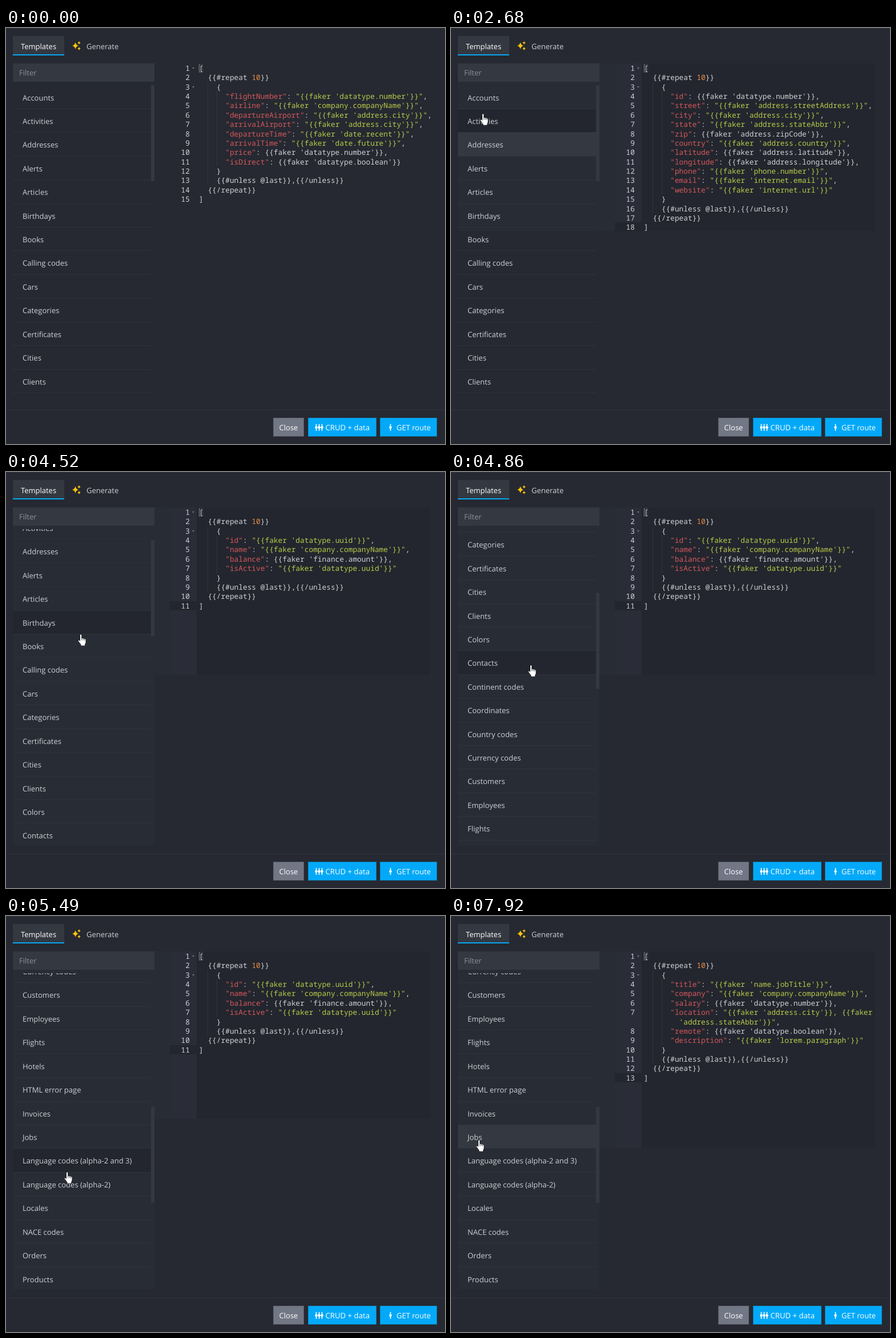
Write an HTML page that moves like this. It is 769x728 px and loops after 8000 ms.

```html
<!DOCTYPE html>
<html lang="en">
<head>
<meta charset="utf-8">
<title>Templates</title>
<style>
html, body { margin: 0; width: 100%; height: 100%; overflow: hidden; background: #262931; }
body { font: 13px "Open Sans", "Noto Sans", sans-serif; color: #cdd0d7; text-rendering: geometricPrecision; }
#stage { position: relative; width: 769px; height: 728px; overflow: hidden; background: #262931; }
#stage div, #stage svg { position: absolute; box-sizing: border-box; white-space: pre; }
.rule { left: 0; width: 769px; height: 1px; background: #31343d; }
.tab { left: 12px; top: 14px; width: 90px; height: 34px; line-height: 36px; text-align: center; color: #fff; background: #343841; border-bottom: 2px solid #03a9f4; }
.generate { left: 141px; top: 14px; line-height: 36px; }
.filter { left: 12px; top: 62px; width: 248px; height: 32px; padding-left: 11px; line-height: 32px; color: #8d919b; background: #343841; }
.tint { left: 12px; width: 248px; background: #282c34; }
#list { left: 12px; top: 100px; width: 248px; height: 554px; overflow: hidden; }
#rows { left: 0; top: .5px; width: 242px; }
.row { left: 0; width: 242px; height: 41.42px; padding-left: 17px; line-height: 42.4px; border-bottom: 1px solid #2f333c; }
.row.hover { background: #23262e; }
.row.lit { background: #343841; }
#bar { left: 242px; top: 0; width: 6px; height: 168px; background: #343843; }
.code { left: 287px; top: 62px; width: 456px; font: 12.833px "Noto Sans Mono", "DejaVu Sans Mono", monospace; color: #cfd1d6; }
.panel, .gutter, .margin { top: 0; height: 293px; }
.panel { left: 47px; width: 409px; background: #23262e; }
.gutter { left: 0; width: 47px; background: #2a2d37; }
.margin { left: -27px; width: 27px; background: #282c34; }
.tall .panel, .tall .gutter, .tall .margin { height: 343px; }
.plain .panel, .plain .gutter, .plain .margin, .plain .active { background: none; }
.active { left: 0; width: 47px; height: 16px; background: #23262e; }
.line { left: 51px; line-height: 16.37px; }
.num { left: 0; width: 35px; text-align: right; line-height: 16.37px; }
.fold { left: 39px; border: 2.5px solid transparent; border-top: 3px solid #6d717b; border-bottom: 0; }
.guide { width: 1px; background: #32353e; }
.key { color: #d5575c; }
.str { color: #b9ca4a; }
.int { color: #e78c45; }
#caret { left: 338px; top: 63px; width: 7px; height: 15px; border: 1px solid #444851; border-left-color: #8b8f97; }
.btn { top: 682px; height: 33px; line-height: 32px; color: #fff; background: #03a9f8; border: 1px solid rgba(38, 41, 49, .3); }
#hand { left: 0; top: 0; }
</style>
</head>
<body>
<div id="stage">
  <div class="rule" style="top:0"></div>
  <div class="tab">Templates</div>
  <svg style="left:115px;top:22px" width="18" height="18" fill="#ffc40c">
    <path d="M6.5 3Q7.6 8 12 9Q7.6 10 6.5 15Q5.4 10 1 9Q5.4 8 6.5 3Z"/>
    <path d="M13 1Q13.4 3.6 16 4Q13.4 4.4 13 7Q12.6 4.4 10 4Q12.6 3.6 13 1Z"/>
    <path d="M13 11Q13.4 13.6 16 14Q13.4 14.4 13 17Q12.6 14.4 10 14Q12.6 13.6 13 11Z"/>
  </svg>
  <div class="generate">Generate</div>
  <div class="tint" id="side" style="top:62px;height:293px"></div>
  <div class="tint" id="below" style="top:355px;height:299px"></div>
  <div class="filter">Filter</div>
  <div id="list"><div id="rows"></div><div id="bar"></div></div>
  <div id="editor"></div>
  <div id="caret"></div>
  <div class="rule" style="top:668px"></div>
  <div class="btn" style="left:468px;width:54px;text-align:center;background:#727786">Close</div>
  <div class="btn" style="left:529px;width:120px;padding-left:29.5px;font-size:13.2px">CRUD + data</div>
  <div class="btn" style="left:655px;width:100px;padding-left:28px">GET route</div>
  <svg id="icons" style="left:529px;top:682px" width="226" height="33" fill="#fff"></svg>
  <svg id="hand" width="16" height="22" style="overflow:visible">
    <path fill="#fff" stroke="#15171c" stroke-width=".9" d="M4.5 2.5a1.6 1.6 0 0 1 3.2 0v5.5c.6-.9 2.3-.6 2.6.4c.8-.7 2.2-.3 2.4.7c1-.5 2.3.1 2.3 1.4v4c0 2-1 3-1.4 4.5v2.2h-7.6v-2c-1-1.8-2.6-3.6-4.3-6c-1-1.5.6-2.8 1.8-1.8l1 1z"/>
    <path fill="none" stroke="#15171c" stroke-width=".8" d="M7.7 8v3.5M10.3 8.5v3M12.7 9.3v2.5"/>
  </svg>
</div>
<script>
const LOOP = 8000, PITCH = 41.42, LINE = 16.37, CH = 7.7;
const $ = id => document.getElementById(id);
const add = (parent, cls, css = {}, html = '') => {
  const el = document.createElement('div');
  el.className = cls;
  el.innerHTML = html;
  Object.assign(el.style, css);
  return parent.appendChild(el);
};

const names = ('Accounts,Activities,Addresses,Alerts,Articles,Birthdays,Books,Calling codes,Cars,Categories,' +
  'Certificates,Cities,Clients,Colors,Contacts,Continent codes,Coordinates,Country codes,Currency codes,' +
  'Customers,Employees,Flights,Hotels,HTML error page,Invoices,Jobs,Language codes (alpha-2 and 3),' +
  'Language codes (alpha-2),Locales,NACE codes,Orders,Products').split(',');
const rows = names.map((name, i) => add($('rows'), 'row', { top: i * PITCH + 'px' }, name));

$('icons').innerHTML = [14.5, 19.5, 24.5, 144.5].map(x =>
  `<rect x="${x - .8}" y="11" width="1.6" height="12"/><circle cx="${x}" cy="17" r="2.3"/>`).join('');

// Fields are "key path"; a trailing "!" leaves the value unquoted.
const templates = [
  'flightNumber datatype.number,airline company.companyName,departureAirport address.city,arrivalAirport address.city,' +
    'departureTime date.recent,arrivalTime date.future,price datatype.number!,isDirect datatype.boolean!',
  'id datatype.number!,street address.streetAddress,city address.city,state address.stateAbbr,zip address.zipCode!,' +
    'country address.country,latitude address.latitude!,longitude address.longitude!,phone phone.number,' +
    'email internet.email,website internet.url',
  'id datatype.uuid,name company.companyName,balance finance.amount!,isActive datatype.uuid',
  'title name.jobTitle,company company.companyName,salary datatype.number!,location address.city+address.stateAbbr,' +
    'remote datatype.boolean!,description lorem.paragraph'
];

function field(spec, i, all) {
  const [key, path] = spec.split(' ');
  const quote = path.endsWith('!') ? '' : '"';
  const value = path.replace('!', '').split('+').map(p => `{{faker '${p}'}}`).join(', ');
  const text = `      "${key}": ${quote}${value}${quote}${i < all.length - 1 ? ',' : ''}`;
  return text.replace(/, \{\{faker /, ", {{faker\n        ").split('\n');
}

const paint = text => text.replace(/^ {8}[^"]*"|"[^"]*"?|\b10\b/g, m =>
  `<span class="${m === '10' ? 'int' : /^"\w+"$/.test(m) ? 'key' : 'str'}">${m}</span>`);

function buildCode(spec, index) {
  const fields = spec.split(',').flatMap(field);
  const lines = ['[', '  {{#repeat 10}}', '    {', ...fields, '    }',
    '    {{#unless @last}},{{/unless}}', '  {{/repeat}}', ']'];
  const box = add($('editor'), 'code' + (index === 0 ? ' plain' : index === 3 ? ' tall' : ''));
  const at = i => i * LINE + 'px';
  for (const part of ['margin', 'gutter', 'panel']) add(box, part);
  add(box, 'active', { top: at(lines.length - 1) });
  add(box, 'guide', { left: 51 + 2 * CH + 'px', top: at(2), height: at(fields.length + 3) });
  add(box, 'guide', { left: 51 + 4 * CH + 'px', top: at(3), height: at(fields.length) });
  let n = 0;
  lines.forEach((text, i) => {
    add(box, 'line', { top: at(i) }, paint(text));
    if (!text.startsWith(' '.repeat(8))) add(box, 'num', { top: at(i) }, ++n);
  });
  for (const i of [0, 2]) add(box, 'fold', { top: i * LINE + 7 + 'px' });
  return box;
}
const codes = templates.map(buildCode);

// Bursts of movement: start, end, number of steps.
const bursts = [[1200, 1460, 4], [2340, 2870, 7], [3480, 3630, 3], [3890, 4680, 10],
  [4770, 5490, 9], [5580, 6310, 9], [7830, 7920, 2]];
const pointer = [[1200, 47, 211.5], [2250, 47, 211.5], [2870, 63, 138.5], [3800, 63, 138.5], [4504.5, 133, 293.4],
  [4680, 138, 318], [5130, 148, 392], [5490, 109, 457], [6127, 49, 401], [7830, 49, 401], [7920, 51, 401]];
const scroll = [[4416, 0], [4504.5, 65.2], [4680, 230], [4770, 300], [5130, 568], [5490, 770]];

function snap(t) {
  let s = 0;
  for (const [a, b, n] of bursts) {
    if (t < a) break;
    const step = (b - a) / (n - 1);
    s = a + Math.min(n - 1, Math.floor((t - a) / step + .22)) * step;
  }
  return s;
}

function track(keys, t, axis) {
  const next = keys.findIndex(k => k[0] > t);
  if (next === 0) return keys[0][axis];
  if (next < 0) return keys[keys.length - 1][axis];
  const a = keys[next - 1], b = keys[next];
  return a[axis] + (b[axis] - a[axis]) * (t - a[0]) / (b[0] - a[0]);
}

const show = (el, on) => { el.style.visibility = on ? 'visible' : 'hidden'; };
const within = (t, a, b) => t >= a && t < b;

function draw(now) {
  const t = snap(now % LOOP);
  const x = track(pointer, t, 1), y = track(pointer, t, 2), top = track(scroll, t, 1);
  const code = t < 1360 ? 0 : t < 3550 ? 1 : t < 6200 ? 2 : 3;
  const lit = within(t, 1280, 3480) ? 2 : within(t, 3480, 3620) ? 0 : t > 6120 ? 25 : -1;
  const hover = t < 1200 ? -1 : Math.floor((y - 111.5 + top) / PITCH);

  codes.forEach((el, i) => show(el, i === code));
  rows.forEach((el, i) => {
    el.className = 'row' + (i === lit ? ' lit' : i === hover ? ' hover' : '');
  });
  show($('side'), code > 0);
  show($('below'), t > 4400);
  show($('caret'), !within(t, 1360, 1450) && !within(t, 3480, 3620) && !within(t, 6200, 6300));
  show($('hand'), t >= 1200);
  $('hand').style.transform = `translate(${Math.round(x - 8)}px, ${Math.round(y - 10.5)}px)`;
  $('rows').style.transform = `translateY(${-top}px)`;
  $('bar').style.transform = `translateY(${top * .304}px)`;
}

const start = performance.now();
function tick() {
  draw(performance.now() - start);
  requestAnimationFrame(tick);
}
tick();
</script>
</body>
</html>
```
